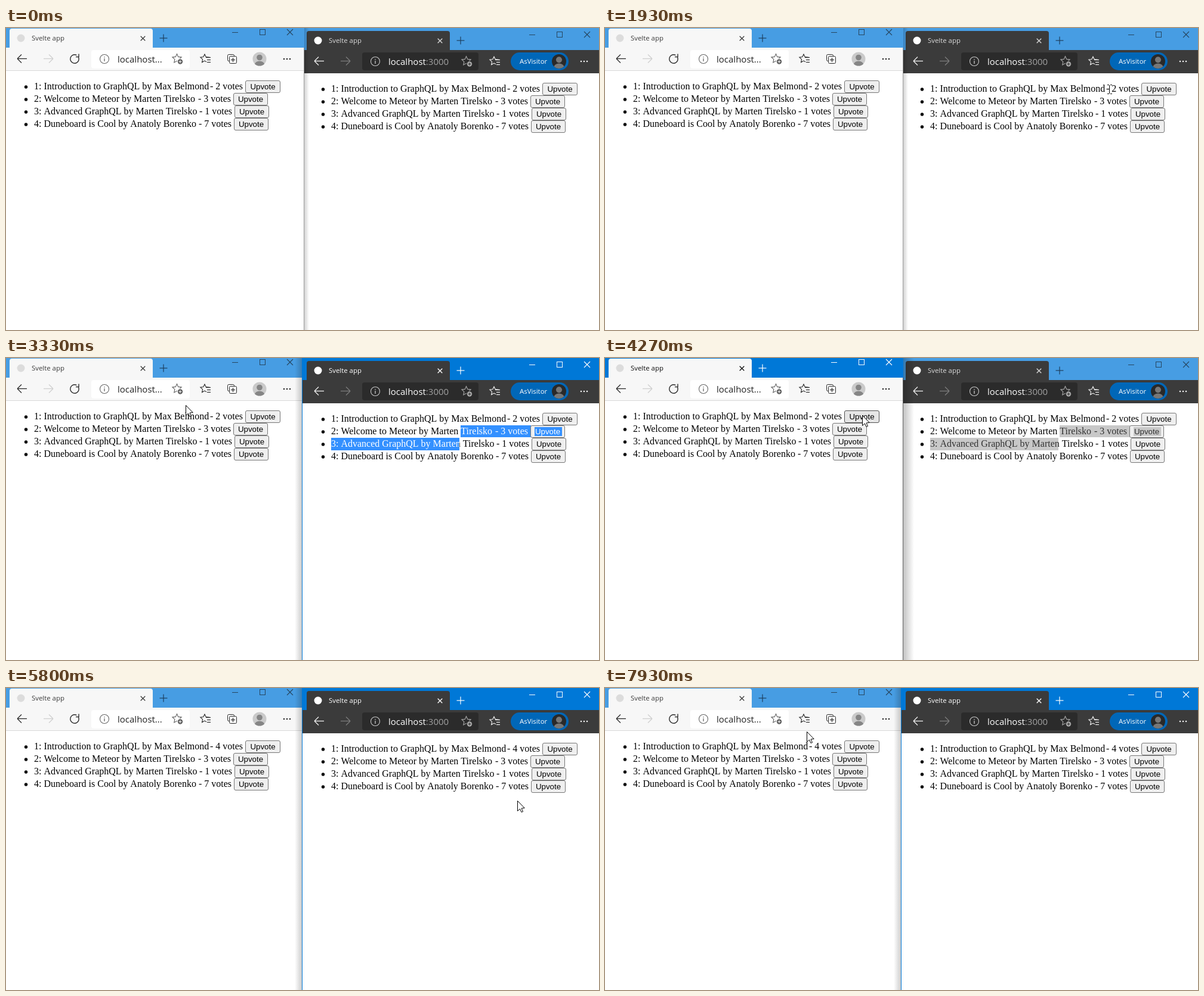
An HTML page with a canvas for the animation above (8000 ms loop, 994 by 507 pixels).

```html
<!DOCTYPE html>
<html lang="en">
<head>
<meta charset="utf-8">
<title>Svelte app</title>
<style>
html, body { margin: 0; width: 100%; height: 100%; overflow: hidden; background: #fff; }
canvas { display: block; width: 994px; height: 507px; }
</style>
</head>
<body>
<canvas id="stage" width="994" height="507"></canvas>
<script>
const ctx = document.getElementById('stage').getContext('2d');
const W = 994, H = 507, LOOP = 8000, TICK = 1000 / 15;
const UI = '"Open Sans", "Noto Sans", sans-serif';
const SERIF = '16px "Liberation Serif", "Times New Roman", serif';
const BUTTON = '13.333px "Liberation Sans", Arial, sans-serif';
const ACTIVE = '#0078d7', INACTIVE = '#479de3';
const DX = 498, DY = 4; // right window relative to the left one

// label, votes, button x, button width
const rows = [
  ['1: Introduction to GraphQL by Max Belmond', 2, 401, 59],
  ['2: Welcome to Meteor by Marten Tirelsko', 3, 381, 58],
  ['3: Advanced GraphQL by Marten Tirelsko', 1, 383, 58],
  ['4: Duneboard is Cool by Anatoly Borenko', 7, 382, 58]
];

// pointer stops: time, x, y
const reading = [
  [133, 60, 5], [333, 30, 60], [600, 28, 150], [933, 140, 110],
  [1200, 230, 130], [1600, 640, 145], [1867, 842, 102], [1933, 846, 103]
];
const selecting = [
  [1933, 846, 103], [2333, 762, 123], [2733, 760, 144], [3000, 600, 120],
  [3333, 301, 79], [3600, 314, 97], [3733, 317, 98], [3800, 317, 98], [4267, 431, 96]
];
const crossing = [
  [5333, 431, 96], [5667, 820, 185], [5800, 857, 189], [5933, 862, 150], [6133, 846, 100]
];
const leaving = [
  [6933, 886, 100], [7133, 836, 123], [7267, 836, 123], [7467, 700, 152],
  [7667, 345, 55], [7733, 328, 45], [7933, 338, 73]
];

function rect(x, y, w, h, fill) {
  ctx.fillStyle = fill;
  ctx.fillRect(x, y, w, h);
}

function round(x, y, w, h, r, fill, stroke) {
  ctx.beginPath();
  ctx.roundRect(x, y, w, h, r);
  if (fill) { ctx.fillStyle = fill; ctx.fill(); }
  if (stroke) { ctx.strokeStyle = stroke; ctx.lineWidth = 1; ctx.stroke(); }
}

function circle(x, y, r, fill, stroke, width = 1.2) {
  ctx.beginPath();
  ctx.arc(x, y, r, 0, 7);
  if (fill) { ctx.fillStyle = fill; ctx.fill(); }
  if (stroke) { ctx.strokeStyle = stroke; ctx.lineWidth = width; ctx.stroke(); }
}

function line(color, width, x1, y1, x2, y2) {
  ctx.strokeStyle = color;
  ctx.lineWidth = width;
  ctx.beginPath();
  ctx.moveTo(x1, y1);
  ctx.lineTo(x2, y2);
  ctx.stroke();
}

function text(s, x, y, font, color, align = 'left') {
  ctx.font = font;
  ctx.fillStyle = color;
  ctx.textAlign = align;
  ctx.fillText(s, x, y);
}

function star(x, y, r, color) {
  ctx.beginPath();
  for (let i = 0; i < 10; i++) {
    const a = i * Math.PI / 5 - Math.PI / 2, d = i % 2 ? r * 0.48 : r;
    ctx.lineTo(x + d * Math.cos(a), y + d * Math.sin(a));
  }
  ctx.closePath();
  ctx.strokeStyle = color;
  ctx.lineWidth = 1.1;
  ctx.stroke();
}

function arrow(x, y, dir, color) {
  const tip = x + 8 * dir;
  line(color, 1.3, x - 8 * dir, y, tip, y);
  for (const d of [-7, 7]) line(color, 1.3, x + dir, y + d, tip, y);
}

function plus(x, y, r, color, width = 1) {
  line(color, width, x - r, y, x + r, y);
  line(color, width, x, y - r, x, y + r);
}

function cross(x, y, r, color, width) {
  line(color, width, x - r, y - r, x + r, y + r);
  line(color, width, x + r, y - r, x - r, y + r);
}

function infoIcon(x, y, color) {
  circle(x, y, 7.5, null, color, 1.1);
  line(color, 1.3, x, y - 1, x, y + 4);
  line(color, 1.3, x, y - 4, x, y - 2.6);
}

function starPlus(x, y, color, back) {
  star(x - 0.5, y - 0.5, 8, color);
  circle(x + 5, y + 4.5, 5.3, back);
  circle(x + 5, y + 4.5, 4.2, color);
  plus(x + 5, y + 4.5, 2.4, back);
}

function starList(x, y, color, back) {
  star(x - 2, y - 0.5, 7.5, color);
  rect(x + 1, y - 3, 8, 10, back);
  for (let i = 0; i < 3; i++) line(color, 1.2, x + (i ? 2 : 0), y - 2.5 + 4 * i, x + 8, y - 2.5 + 4 * i);
}

function dots(x, y, color) {
  for (const d of [-5, 0, 5]) circle(x + d, y, 1.3, color);
}

function person(x, y, r, back, skin) {
  ctx.save();
  circle(x, y, r, back);
  ctx.clip();
  circle(x, y - r * 0.22, r * 0.42, skin);
  ctx.beginPath();
  ctx.ellipse(x, y + r * 0.85, r * 0.72, r * 0.55, 0, 0, 7);
  ctx.fill();
  ctx.restore();
}

function titleBar(active, tabFill, tabText, mark) {
  const ink = active ? '#fff' : '#27465f';
  round(6, 1, 240, 34, [4, 4, 0, 0], tabFill);
  circle(25, 17, 6.5, mark);
  text('Svelte app', 43, 21, '11.4px ' + UI, tabText);
  cross(229.5, 17.5, 3.8, tabText, 1.3);
  plus(264, 17, 6.5, active ? '#fff' : '#1d3f5e', 1.2);
  line(ink, 1, 379, 7.5, 389, 7.5);
  ctx.strokeRect(425.5, 2.5, 9, 9);
  cross(476, 7, 5, ink, 1.1);
}

function rowText(i, votes, color) {
  const [label, , bx] = rows[i], y = 103 + 21 * i;
  text(label, 47, y, SERIF, color);
  text('- ' + votes + ' votes', bx - 4, y, SERIF, color, 'right');
}

function highlight(x, y, w, h, fill, paint) {
  ctx.save();
  ctx.beginPath();
  ctx.rect(x, y, w, h);
  ctx.clip();
  rect(x, y, w, h, fill);
  paint();
  ctx.restore();
}

function page(first, selection, hover, pressed) {
  rows.forEach(([, count, bx, bw], i) => {
    const y = 88 + 21 * i, votes = i ? count : first, hot = hover && !i;
    circle(33.5, y + 11, 2.7, '#000');
    rowText(i, votes, '#000');
    const label = c => text('Upvote', bx + bw / 2, y + 15, BUTTON, c, 'center');
    const select = (x, top, w, h, paint) => highlight(x, y + top, w, h, selection.fill, paint);
    if (selection && i === 1) select(264, 0, 118, 20, () => rowText(1, votes, selection.ink));
    if (selection && i === 2) select(47, 0, 215, 21, () => rowText(2, votes, selection.ink));
    const fill = hot ? (pressed ? '#f5f5f5' : '#e5e5e5') : '#efefef';
    const edge = hot ? (pressed ? '#8d8d8d' : '#4f4f4f') : '#767676';
    round(bx + 0.5, y + 0.5, bw - 1, 20, 2.5, fill, edge);
    label('#000');
    if (selection && i === 1) select(388, 3, 46, 15, () => label(selection.ink));
  });
}

function leftWindow(s) {
  const on = s.mode === 'left', bar = '#f7f7f7', ink = '#2b2b2b';
  rect(0, 0, 499, H, '#fff');
  rect(0, 0, 500, 33, on ? ACTIVE : INACTIVE);
  rect(0, 33, 499, 38, bar);
  rect(0, 71, 499, 1, '#d8d8d8');
  titleBar(on, bar, on ? '#111' : '#3c3c3c', '#dcdcdc');
  arrow(27, 51.5, -1, ink);
  arrow(71, 51.5, 1, '#cfcfcf');
  ctx.beginPath();
  ctx.arc(115, 52, 7.2, -0.5, 5.2);
  ctx.strokeStyle = ink;
  ctx.lineWidth = 1.4;
  ctx.stroke();
  line(ink, 1.4, 122, 43.5, 122, 49);
  line(ink, 1.4, 122, 48.5, 117, 48.5);
  round(143, 37, 165, 31, 4, '#fff');
  infoIcon(165, 52, '#666');
  text('localhost...', 187, 58, '15px ' + UI, '#222');
  starPlus(287, 52, '#606060', '#fff');
  starList(335, 52, ink, bar);
  round(371.5, 44.5, 11, 11, 2, null, ink);
  round(374.5, 47.5, 12, 12, 2, bar, ink);
  plus(380.5, 53.5, 3.5, ink, 1.2);
  person(425, 52, 11.5, '#cacaca', '#858585');
  dots(471, 52, ink);
  page(s.votes, null, s.hover, s.pressed);
}

function rightWindow(s) {
  const on = s.mode === 'right', bar = '#3b3b3b', x0 = on ? 496 : 499;
  rect(x0, 0, W - x0, H, '#fff');
  rect(x0, 0, W - x0, 37, on ? ACTIVE : INACTIVE);
  rect(x0, 37, W - x0, 39, bar);
  if (on) rect(496, 0, 1, H, ACTIVE);
  ctx.save();
  ctx.translate(DX, DY);
  titleBar(on, bar, on ? '#fff' : '#dadada', '#fff');
  arrow(27, 51.5, -1, '#f0f0f0');
  arrow(71, 51.5, 1, '#7c7c7c');
  round(99, 37, 195, 30, 4, '#2b2b2b');
  infoIcon(121, 52, '#c8c8c8');
  text('localhost', 143, 58, '15px ' + UI, '#fff');
  text(':3000', 143 + ctx.measureText('localhost').width, 58, '15px ' + UI, '#a0a0a0');
  starPlus(274, 52, '#a8a8a8', '#2b2b2b');
  starList(322, 52, '#f0f0f0', bar);
  round(348, 37, 97, 30, 15, '#0067b8');
  text('AsVisitor', 363, 56, '11.4px ' + UI, '#fff');
  person(429, 52, 12, '#292929', '#777');
  dots(471, 52, '#f0f0f0');
  const colors = on ? { fill: '#3390ff', ink: '#fff' } : { fill: '#c8c8c8', ink: '#323232' };
  page(s.votes, s.selected && colors, false, false);
  ctx.restore();
}

function shadow(from, to, alpha) {
  const g = ctx.createLinearGradient(from, 0, to, 0);
  g.addColorStop(0, `rgba(0,0,0,${alpha})`);
  g.addColorStop(1, 'rgba(0,0,0,0)');
  rect(Math.min(from, to), 0, Math.abs(to - from), H, g);
}

function along(stops, t) {
  const i = stops.findIndex(p => p[0] >= t);
  if (i < 1) return stops[i ? stops.length - 1 : 0].slice(1);
  const [t0, x0, y0] = stops[i - 1], [t1, x1, y1] = stops[i], k = (t - t0) / (t1 - t0);
  return [x0 + (x1 - x0) * k, y0 + (y1 - y0) * k];
}

function pointerAt(t) {
  if (t < 130) return null;
  if (t < 1934) return along(reading, t);
  if (t < 5300) return along(selecting, t);
  if (t < 6133) return along(crossing, t);
  if (t > 6933) return along(leaving, t);
  // circles around the vote count
  const a = (t - 6133) / 800 * 3 * Math.PI;
  return [866 - 20 * Math.cos(a), 100 - 5 * Math.sin(a)];
}

function overText(x, y) {
  if (x > DX) { x -= DX; y -= DY; }
  const row = rows[Math.floor((y - 88) / 21)];
  return Boolean(row) && x > 46 && x < row[2] - 3;
}

function pointer(x, y) {
  if (overText(x, y)) {
    for (const d of [-7.5, 7.5]) {
      line('#000', 1, x - 4, y + d, x - 1, y + d);
      line('#000', 1, x + 1, y + d, x + 4, y + d);
    }
    line('#000', 1, x - 0.5, y - 7, x - 0.5, y + 7);
    return;
  }
  ctx.beginPath();
  [[0, 0], [0, 17], [4, 13.5], [6.5, 19], [9, 18], [6.6, 12.5], [11.7, 12]]
    .forEach(([px, py]) => ctx.lineTo(x + 0.5 + px, y + 0.5 + py));
  ctx.closePath();
  ctx.fillStyle = '#fff';
  ctx.fill();
  ctx.strokeStyle = '#000';
  ctx.lineWidth = 1;
  ctx.stroke();
}

function render(time) {
  const t = Math.floor((time + 5) / TICK) * TICK + 0.5;
  const s = {
    mode: t < 2266 ? 'none' : t > 3660 && t < 5730 ? 'left' : 'right',
    votes: t < 4730 ? 2 : t < 5330 ? 3 : 4,
    selected: t > 2730 && t < 5730,
    hover: t > 4190 && t < 5430,
    pressed: (t > 4660 && t < 4730) || (t > 5260 && t < 5330)
  };
  if (s.mode === 'right') {
    leftWindow(s);
    shadow(496, 484, 0.2);
    rightWindow(s);
  } else {
    const on = s.mode === 'left';
    rightWindow(s);
    shadow(500, on ? 518 : 508, on ? 0.24 : 0.18);
    leftWindow(s);
    rect(499, 33, 1, H - 33, on ? '#606060' : '#9a9a9a');
  }
  const p = pointerAt(t);
  if (p) pointer(Math.round(p[0]), Math.round(p[1]));
}

function frame() {
  render(performance.now() % LOOP);
  requestAnimationFrame(frame);
}
frame();
</script>
</body>
</html>
```
